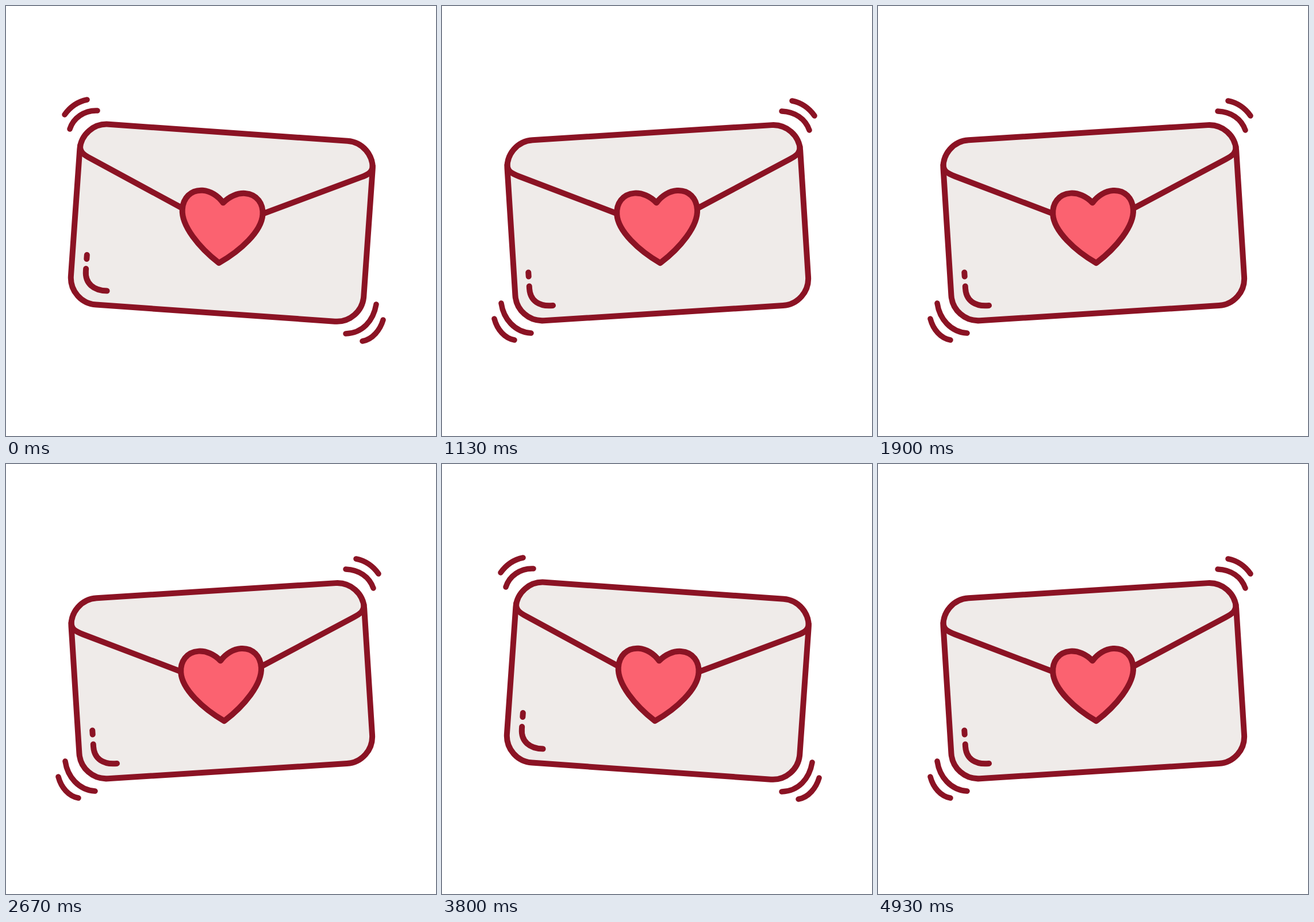
Recreate the animation shown at these times as an HTML page. Size 748 px wide and 748 px high, loop 5.31 s.

```html
<!DOCTYPE html>
<html lang="en">
<head>
<meta charset="utf-8">
<title>Shaking love letter</title>
<style>
  html, body { margin: 0; width: 100%; height: 100%; overflow: hidden; background: #fff; }
  svg { display: block; width: 100%; height: 100%; }
  .ink { fill: none; stroke: #8b1324; stroke-width: 10; stroke-linecap: round; stroke-linejoin: round; }
  .paper { fill: #efebe9; }
  .seal { fill: #fb6270; }
  .shake { stroke-width: 9.5; }
</style>
</head>
<body>
<svg viewBox="0 0 748 748">
  <g id="letter" class="ink">
    <rect class="paper" x="-255.3" y="-157.3" width="510.6" height="314.6" rx="47"/>
    <path d="M-255-117C-255-105-247-101-236-96L-72-21.5M255-117C255-105 247-101 236-96L72-21.5"/>
    <path class="seal" d="M0-35C-10-47-24-54-37-54C-58-54-70-38-70-19C-70 10-36 46 0 70C36 46 70 10 70-19C70-38 58-54 37-54C24-54 10-47 0-35Z"/>
    <path d="M-230 72V79M-230 96V100C-230 122-214 133-191 132"/>
  </g>
  <path id="shakeRight" class="ink shake" d="M102 189C112 175 126 166 141 163M111 214C117 195 136 181 159 182M644 519C639 548 620 569 591 570M656 546C651 563 638 580 620 583"/>
  <path id="shakeLeft" class="ink shake" d="M609 165C625 168 639 178 648 191M591 183C614 184 632 196 639 216M103 517C107 544 126 567 155 569M91 544C96 563 109 578 126 581"/>
</svg>
<script>
  const LOOP = 5310;
  // The letter flips to the other tilt at each of these times.
  const FLIPS = [370, 770, 1130, 1530, 1900, 2300, 2670, 3070, 3400, 3800, 4170, 4570, 4930];
  const byId = id => document.getElementById(id);
  const letter = byId('letter');
  const shakeRight = byId('shakeRight');
  const shakeLeft = byId('shakeLeft');
  const start = performance.now();

  function draw(time) {
    const tiltsLeft = FLIPS.filter(flip => flip <= time).length % 2 === 1;
    letter.setAttribute('transform', `translate(375.3 377.2) rotate(${tiltsLeft ? -3.6 : 4})`);
    shakeRight.style.display = tiltsLeft ? 'none' : '';
    shakeLeft.style.display = tiltsLeft ? '' : 'none';
  }

  function tick() {
    draw((performance.now() - start) % LOOP);
    requestAnimationFrame(tick);
  }

  tick();
</script>
</body>
</html>
```
